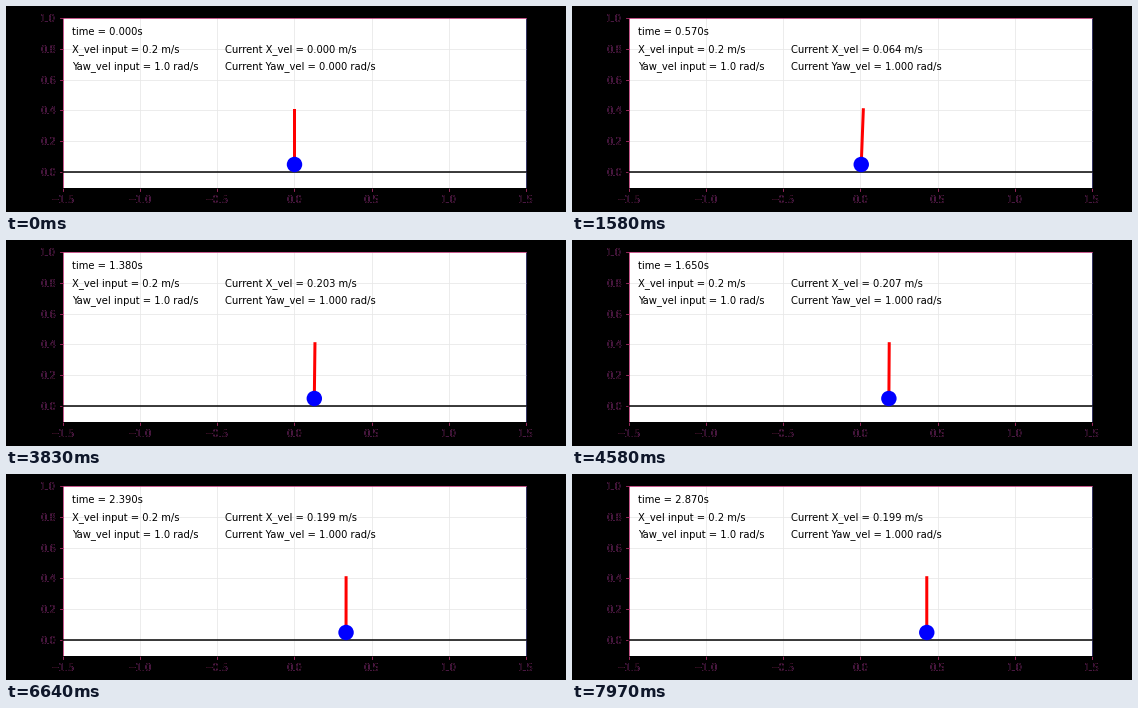
Animation, 560 px wide and 206 px high, one loop 8000 ms. Source, as a matplotlib script:

```python
import numpy as np
import matplotlib.pyplot as plt
from matplotlib.animation import FuncAnimation
from matplotlib.patches import Circle, Rectangle

W, H, DPI = 560, 206, 72
LOOP, TICK = 8000, 10            # ms
STEPS, DT = 288, 0.01            # simulation steps in one loop
SCALE, X0, Y0 = 154.33, 288.5, 166.2   # pixels per metre, origin
RADIUS, ROD = 0.05, 0.355
L, R, B, T = -1.5, 1.5, -.1, 1.0

PINK, BLUE, GRID = "#b83070", "#40407a", "#e8e8e8"


def bump(t, center, width):
    return np.exp(-((t - center) / width) ** 2)


# Rolls back briefly, speeds up along an S-curve, overshoots and settles.
time = np.arange(STEPS) * DT
vel = (.2 * (1 - np.exp(-(time / .805) ** 2.73)) - time * np.exp(-13 * time)
       + .007 * bump(time, 1.6, .43) - .0013 * bump(time, 2.6, .4))
pos = np.concatenate([[0], np.cumsum((vel[1:] + vel[:-1]) / 2 * DT)])
tilt = .038 * (time / .55 * np.exp(1 - time / .55)) ** 2
yaw = 1 - np.exp(-time / .06) + .0007 * bump(time, 1.92, .2)

plt.rcParams["font.family"] = "DejaVu Sans"
fig = plt.figure(figsize=(W / DPI, H / DPI), dpi=DPI, facecolor="black")
ax = fig.add_axes([0, 0, 1, 1])
ax.set_xlim(-X0 / SCALE, (W - X0) / SCALE)
ax.set_ylim((Y0 - H) / SCALE, Y0 / SCALE)
ax.axis("off")


def line(xs, ys, color, lw=.8, z=2):
    return ax.plot(xs, ys, color=color, lw=lw, zorder=z)[0]


def label(x, y, s, **kw):
    return fig.text(x / W, 1 - y / H, s, fontsize=10, **kw)


def tick_label(x, y, value, **kw):
    # Black over colour leaves only the coloured rim of each glyph.
    for color in ("#5048ff", "#ff3c80", "black"):
        label(x, y, f"{value:.1f}".replace("-", "\u2212"), color=color, **kw)


ax.add_patch(Rectangle((L, B), R - L, T - B, fc="white", lw=0, zorder=0))

tick = 3.5 / SCALE
for x in np.arange(L, R + .1, .5):
    if abs(x) < R:
        line([x, x], [B, T], GRID, z=1)
    line([x, x], [B - tick, B], PINK)
    tick_label(X0 + x * SCALE, 189, x, ha="center", va="top")
for y in np.arange(0, T + .1, .2):
    if y < .9:
        line([L, R], [y, y], GRID, z=1)
    line([L - tick, L], [y, y], PINK)
    tick_label(X0 + L * SCALE - 7, Y0 - y * SCALE, y,
               ha="right", va="center_baseline")

line([R, R], [B, T], BLUE)
line([L, L], [B, T], PINK)
line([L, R], [T, T], PINK)
line([L, R], [B, B], "black")
line([L, R], [0, 0], "black", 1.5)

rod = line([0, 0], [RADIUS, RADIUS + ROD], "red", 3, z=3)
wheel = ax.add_patch(Circle((0, RADIUS), RADIUS, fc="blue", lw=0, zorder=4))

clock = label(66, 29, "")
label(66, 46, "X_vel input = 0.2 m/s")
label(66, 63, "Yaw_vel input = 1.0 rad/s")
vel_text = label(219, 46, "")
yaw_text = label(219, 63, "")


def update(i):
    k = min(int((i * TICK + 4.99) * STEPS / LOOP), STEPS - 1)
    x, a = pos[k], tilt[k]
    rod.set_data([x, x + ROD * np.sin(a)], [RADIUS, RADIUS + ROD * np.cos(a)])
    wheel.center = (x, RADIUS)
    clock.set_text(f"time = {time[k]:.3f}s")
    vel_text.set_text(f"Current X_vel = {vel[k]:.3f} m/s")
    yaw_text.set_text(f"Current Yaw_vel = {yaw[k]:.3f} rad/s")
    return rod, wheel, clock, vel_text, yaw_text


anim = FuncAnimation(fig, update, frames=LOOP // TICK, interval=TICK,
                     repeat=True, repeat_delay=0, blit=False)
plt.show()
```
